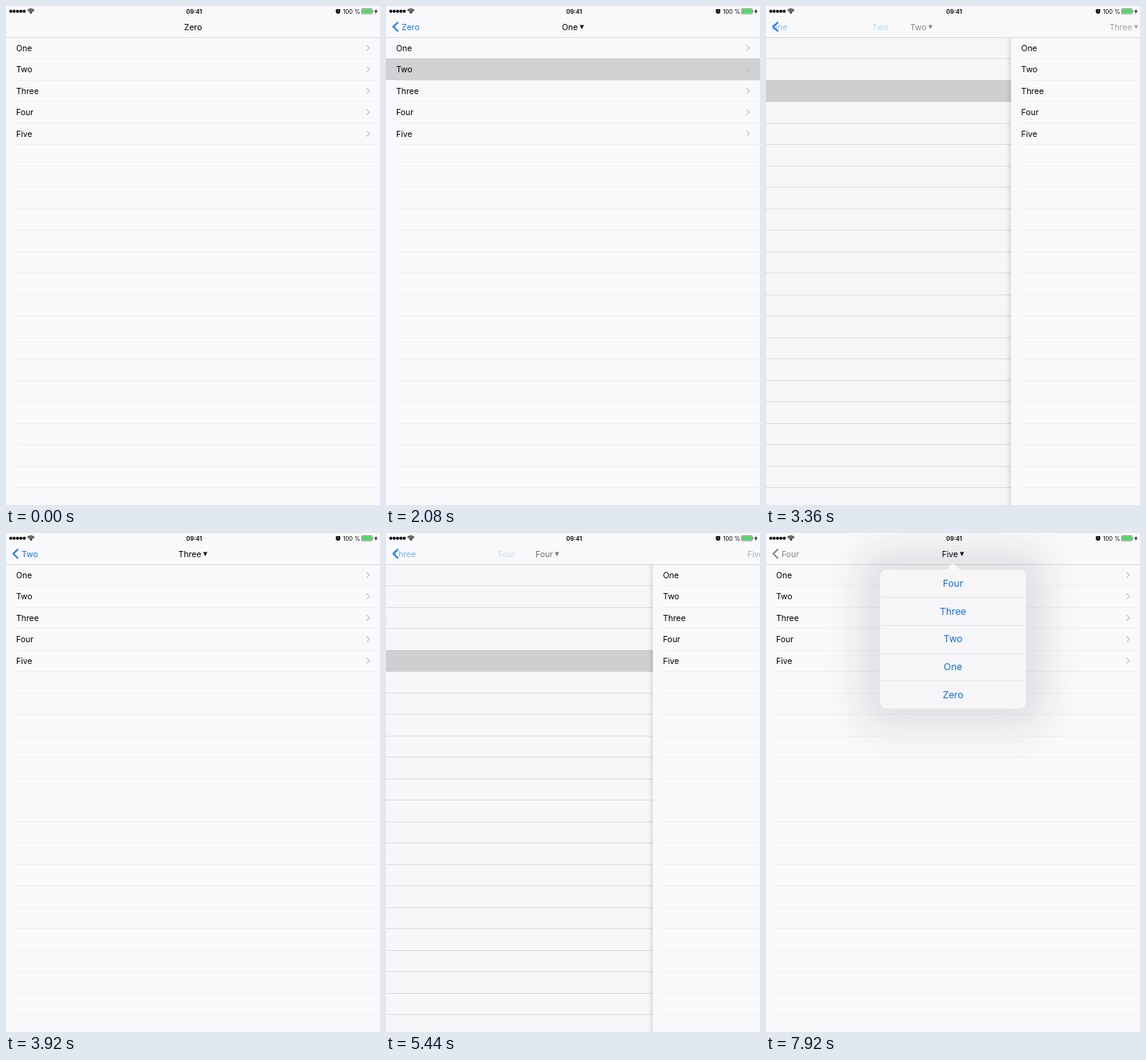
Write an HTML page with a canvas that moves like this. It is 480 px wide and 640 px high and loops after 8000 ms.

```html
<!DOCTYPE html>
<html lang="en">
<head>
<meta charset="utf-8">
<title>Navigation stack</title>
<style>
  html, body { margin: 0; width: 100%; height: 100%; overflow: hidden; background: #f9f9fb; }
  canvas { display: block; width: 480px; height: 640px; }
</style>
</head>
<body>
<canvas id="stage"></canvas>
<script>
const W = 480, H = 640, LOOP = 8000;
const BAR = 40, ROW = 27.5;
const PAPER = '#f9f9fb', BLUE = '#1478ee', GREY = '#858488', RULE = '#efeff1';
const NAMES = ['Zero', 'One', 'Two', 'Three', 'Four', 'Five'];
const TAPS = [800, 1920, 2960, 4000, 4960];
const PUSHES = [1136, 2260, 3300, 4275, 5388];
const PUSH_TIME = 500, SPRING = 0.02;
const PRESS = 6160, POPOVER = 6400;

const canvas = document.getElementById('stage');
const ctx = canvas.getContext('2d');
const dpr = window.devicePixelRatio || 1;
canvas.width = W * dpr;
canvas.height = H * dpr;

function font(size, weight = 400) {
  ctx.font = `${weight} ${size}px Inter, Roboto, sans-serif`;
}

function text(str, x, y, color, alpha = 1) {
  ctx.globalAlpha = alpha;
  ctx.fillStyle = color;
  ctx.fillText(str, x, y);
  ctx.globalAlpha = 1;
}

function rect(x, y, w, h, color) {
  ctx.fillStyle = color;
  ctx.fillRect(x, y, w, h);
}

function line(points, color, width) {
  ctx.beginPath();
  points.forEach(([x, y]) => ctx.lineTo(x, y));
  ctx.strokeStyle = color;
  ctx.lineWidth = width;
  ctx.stroke();
}

function disc(x, y, r) {
  ctx.beginPath();
  ctx.arc(x, y, r, 0, 7);
  ctx.fill();
}

function drawList(x, selected, ruleColor) {
  ctx.save();
  ctx.translate(x, 0);
  rect(0, BAR, W, H - BAR, PAPER);
  for (let k = 1; k < 22; k++) {
    rect(13, Math.floor(BAR + ROW * k), W, 1, ruleColor);
  }
  if (selected) {
    const top = Math.floor(BAR + ROW * (selected - 1));
    rect(0, top, W, 28, '#d1d0d3');
  }
  font(10.5);
  for (let i = 1; i <= 5; i++) {
    const mid = BAR + ROW * (i - 0.5);
    text(NAMES[i], 13, mid + 3.8, '#000');
    line([[462.7, mid - 3.7], [466.5, mid], [462.7, mid + 3.7]], '#c2c1c7', 1.1);
  }
  ctx.restore();
}

// Title centred on cx, with a small triangle on every level but the first
function drawTitle(level, cx, alpha) {
  font(10.6);
  const width = ctx.measureText(NAMES[level]).width;
  const left = cx - (level ? width + 8 : width) / 2;
  text(NAMES[level], left, 30.5, '#000', alpha);
  if (!level) return;
  const x = left + width + 2.5;
  ctx.globalAlpha = alpha;
  ctx.beginPath();
  ctx.moveTo(x, 24.6);
  ctx.lineTo(x + 5.2, 24.6);
  ctx.lineTo(x + 2.6, 29.8);
  ctx.fill();
  ctx.globalAlpha = 1;
}

function drawBackLabel(level, x, color, alpha) {
  font(10.6);
  text(NAMES[level], x, 30.5, color, alpha);
}

function drawBackArrow(color, alpha) {
  ctx.globalAlpha = alpha;
  line([[15.5, 20.6], [9.4, 26.6], [15.5, 32.6]], color, 2);
  ctx.globalAlpha = 1;
}

function drawStatus() {
  ctx.fillStyle = '#000';
  for (let i = 0; i < 5; i++) disc(6.2 + 4.3 * i, 6.7, 1.95);

  ctx.strokeStyle = '#000';
  ctx.lineWidth = 1.1;
  for (const r of [2.6, 4.5, 6.3]) {
    ctx.beginPath();
    ctx.arc(32, 9.6, r - 0.4, -Math.PI * 0.76, -Math.PI * 0.24);
    ctx.stroke();
  }
  disc(32, 8.9, 0.9);

  font(7.6, 600);
  ctx.textAlign = 'center';
  text('09:41', 241.3, 9.6, '#000');
  font(7.5);
  text('100 %', 443.5, 9.5, '#000');
  ctx.textAlign = 'left';

  // Alarm clock
  disc(426.2, 6.9, 2.8);
  disc(424.2, 4.8, 0.8);
  disc(428.2, 4.8, 0.8);
  line([[426.2, 5.4], [426.2, 7.1], [427.5, 7.1]], '#fff', 0.6);

  // Battery
  rect(457, 4.2, 12.3, 5.2, '#4cd964');
  ctx.strokeStyle = '#555';
  ctx.lineWidth = 0.6;
  ctx.beginPath();
  ctx.roundRect(456.3, 3.5, 13.7, 6.6, 1);
  ctx.stroke();
  rect(470.4, 5.6, 0.9, 2.4, '#555');
  ctx.fillStyle = '#000';
  ctx.beginPath();
  [[475.7, 3.4], [472.8, 7.3], [474.6, 7.3], [473.8, 10.2], [476.9, 6.2], [475, 6.2]]
    .forEach(([x, y]) => ctx.lineTo(x, y));
  ctx.fill();
}

function popoverShape() {
  ctx.beginPath();
  ctx.roundRect(146.5, 47, 187.3, 178, 8);
  ctx.moveTo(231, 47.5);
  ctx.lineTo(238.5, 39.6);
  ctx.quadraticCurveTo(240, 38, 241.5, 39.6);
  ctx.lineTo(249, 47.5);
  ctx.closePath();
}

// The caster is wider than the popover and sits off stage, so only its shadow shows
function drawPopoverShadow() {
  const grow = 27;
  ctx.save();
  ctx.shadowColor = 'rgba(25, 10, 30, 0.105)';
  ctx.shadowBlur = 46 * dpr;
  ctx.shadowOffsetX = 2 * W * dpr;
  ctx.beginPath();
  ctx.roundRect(146.5 - grow - 2 * W, 47 - grow, 187.3 + 2 * grow, 178 + 2 * grow, 8 + grow);
  ctx.fill();
  ctx.restore();
}

function drawPopover() {
  drawPopoverShadow();
  ctx.fillStyle = '#f6f5f8';
  popoverShape();
  ctx.fill();

  const step = 178 / 5;
  font(12.3);
  ctx.textAlign = 'center';
  for (let i = 0; i < 5; i++) {
    const top = 47 + step * i;
    if (i) rect(146.5, Math.round(top - 0.3), 187.3, 1, '#e5e4e8');
    text(NAMES[4 - i], 240, top + step / 2 + 4.4, '#1670dc');
  }
  ctx.textAlign = 'left';
}

function drawNav(level, t) {
  const open = t >= POPOVER;
  if (level) {
    const tint = open ? GREY : BLUE;
    drawBackArrow(tint, 1);
    drawBackLabel(level - 1, 20, tint, 1);
  }
  drawTitle(level, 240, t >= PRESS && !open ? 0.4 : 1);
}

// rest runs from 1 (push begins) to 0 (settled)
function drawNavPush(from, rest) {
  const p = 1 - rest;
  const fade = Math.pow(rest, 1.8);
  if (from) drawBackLabel(from - 1, 20 - 38 * p, BLUE, fade);
  drawBackLabel(from, 20 + 162.5 * Math.pow(rest, 0.8), BLUE, from ? p * 0.8 : Math.pow(p, 10));
  drawBackArrow(BLUE, from ? 1 : Math.pow(p, 8));
  drawTitle(from, 240 - 249 * (1 - Math.pow(rest, 0.42)), fade);
  drawTitle(from + 1, 240 + 329 * Math.pow(rest, 0.96), p);
}

function drawPages(from, rest) {
  const x = W * rest, p = 1 - rest;
  drawList(-0.3 * W * p, from + 1, '#e0dee2');
  rect(0, BAR, W, H - BAR, `rgba(10, 0, 10, ${0.09 * p * p})`);
  const shade = ctx.createLinearGradient(x - 6, 0, x, 0);
  shade.addColorStop(0, 'rgba(0, 0, 0, 0)');
  shade.addColorStop(1, 'rgba(0, 0, 0, 0.11)');
  rect(x - 6, BAR, 6, H - BAR, shade);
  drawList(x, 0, RULE);
}

function draw(t) {
  ctx.setTransform(dpr, 0, 0, dpr, 0, 0);
  const level = PUSHES.filter(start => t >= start + PUSH_TIME).length;
  const moving = level < 5 && t >= PUSHES[level];
  const age = moving ? (t - PUSHES[level]) * SPRING : 0;
  const rest = (1 + age) * Math.exp(-age);

  if (moving) drawPages(level, rest);
  else drawList(0, t >= TAPS[level] ? level + 1 : 0, RULE);

  rect(0, 0, W, BAR, '#f9f9fb');
  rect(0, BAR, W, 1, '#d8d7da');
  if (moving) drawNavPush(level, rest);
  else drawNav(level, t);
  if (t >= POPOVER) drawPopover();
  drawStatus();
}

const begin = performance.now();
function tick() {
  draw((performance.now() - begin) % LOOP);
  requestAnimationFrame(tick);
}
tick();
</script>
</body>
</html>
```
